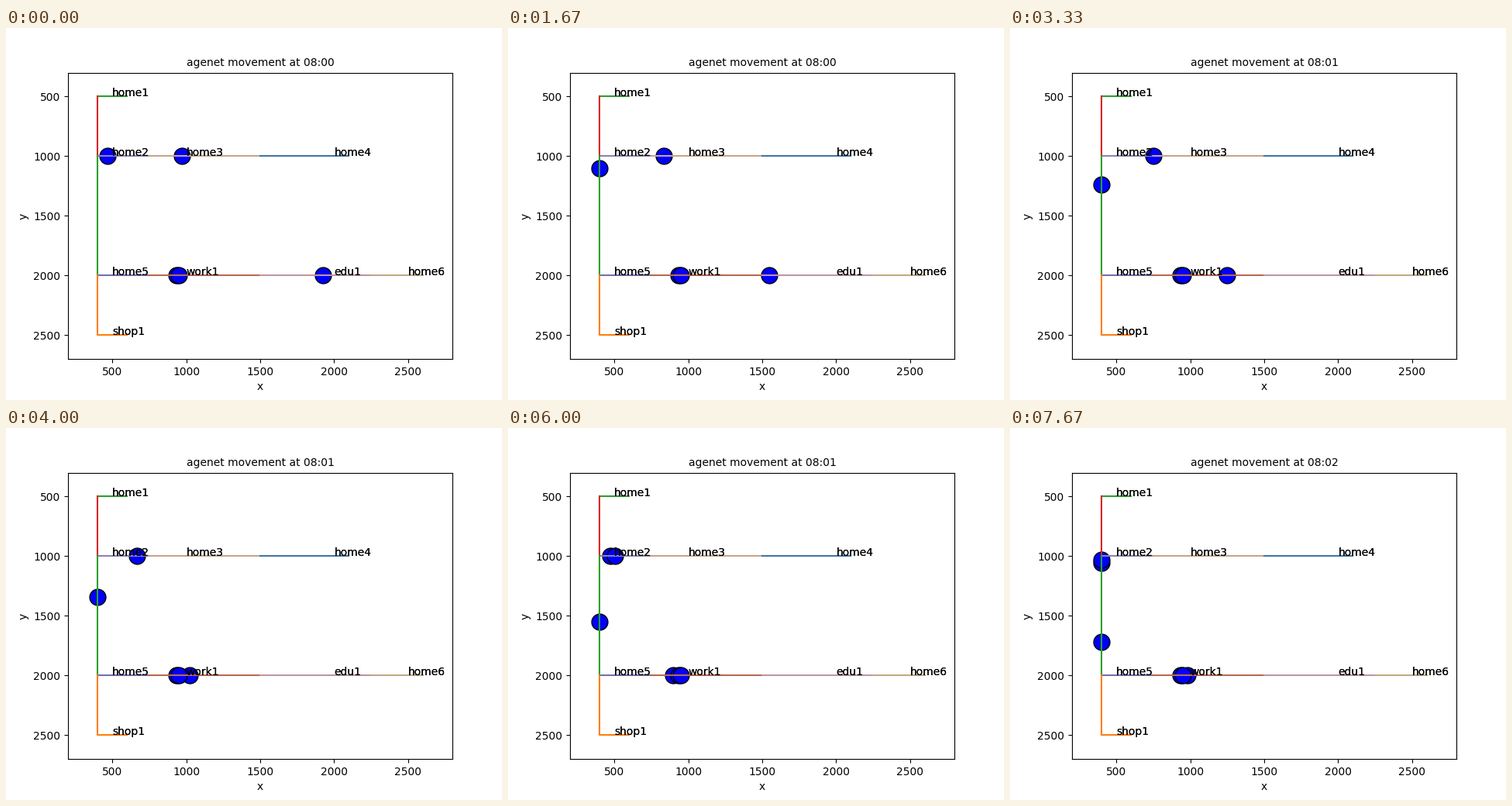
These frames come from a looping animation (640 by 480 pixels, 8000 ms). A matplotlib script:

```python
import matplotlib.pyplot as plt
from matplotlib.animation import FuncAnimation

STEPS = 24
CORNER = 400

ROADS = [
    ([400, 600], [500, 500], "tab:green"),
    ([400, 750], [1000, 1000], "#8c82b4"),
    ([750, 1500], [1000, 1000], "#c6a68a"),
    ([1500, 2100], [1000, 1000], "#3f78a8"),
    ([400, 750], [2000, 2000], "#7372ad"),
    ([750, 1500], [2000, 2000], "#b96a50"),
    ([1500, 2250], [2000, 2000], "#bd96a3"),
    ([2250, 2600], [2000, 2000], "#bfab86"),
    ([400, 400], [500, 1000], "tab:red"),
    ([400, 400], [1000, 2000], "tab:green"),
    ([400, 400, 600], [2000, 2500, 2500], "tab:orange"),
]
PLACES = {
    "home1": (500, 500), "home2": (500, 1000), "home3": (1000, 1000),
    "home4": (2000, 1000), "home5": (500, 2000), "home6": (2500, 2000),
    "work1": (1000, 2000), "edu1": (2000, 2000), "shop1": (500, 2500),
}


def walk_west_then_south(start, speed, steps, stops=(CORNER,)):
    """Move along y=1000, pausing exactly on each junction, then turn down."""
    x, y = start, 1000
    for _ in range(steps):
        if x > CORNER:
            stop = max(s for s in stops if s < x)
            x = max(x - speed, stop)
        else:
            y += speed
    return x, y


def commuter(n):
    """Drive west to the junction at 750, then come back to work."""
    if n <= 16:
        return max(1924.5 - 75 * n, 750), 2000
    return min(745 + 75 * (n - 16), 980), 2000


def late_walker(n):
    if n < 17:
        return None
    return walk_west_then_south(500, 27.5, n - 17)


# Listed from bottom to top
AGENTS = [
    commuter,
    lambda n: (935, 2000),
    lambda n: (950, 2000),
    late_walker,
    lambda n: walk_west_then_south(467.5, 34.2, n),
    lambda n: walk_west_then_south(972.5, 27.5, n, (CORNER, 750)),
]

fig, ax = plt.subplots(figsize=(6.4, 4.8), dpi=100)
ax.set_xlim(200, 2800)
ax.set_ylim(2700, 300)
ax.set_xlabel("x")
ax.set_ylabel("y")
title = ax.set_title("", fontsize=10)

markers = [
    ax.plot([], [], "o", ms=15, mfc="blue", mec="black", mew=1)[0]
    for _ in AGENTS
]
for xs, ys, color in ROADS:
    ax.plot(xs, ys, color=color, lw=1.5)
for name, (x, y) in PLACES.items():
    for _ in range(2):  # doubled for the heavier lettering
        ax.text(x, y, name)


def update(n):
    title.set_text(f"agenet movement at 08:{(n + 1) // 10:02d}")
    for marker, agent in zip(markers, AGENTS):
        spot = agent(n)
        marker.set_data(*([[c] for c in spot] if spot else ([], [])))
    return [title, *markers]


anim = FuncAnimation(fig, update, frames=STEPS, interval=8000 / STEPS,
                     repeat=True, repeat_delay=0, blit=False)
plt.show()
```
